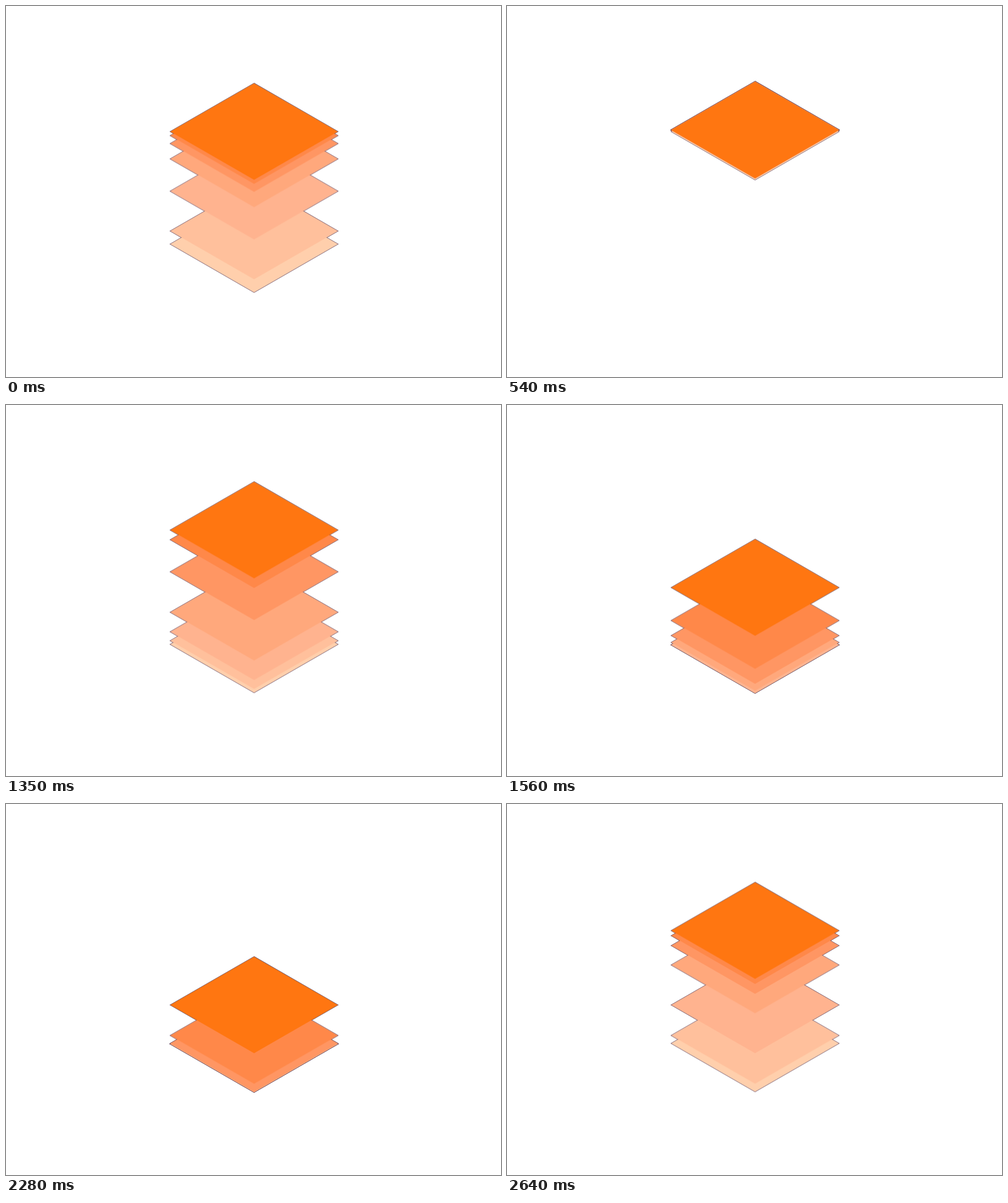
Recreate the animation shown at these times as an HTML page. Size 800 by 600 pixels, loop 2670 ms.

```html
<!DOCTYPE html>
<html lang="en">
<head>
<meta charset="utf-8">
<title>Stacked layers</title>
<style>
  html, body { margin: 0; width: 100%; height: 100%; overflow: hidden; background: #fff; }
  svg { display: block; width: 800px; height: 600px; }
  #outlines { fill: none; stroke: #4c2a44; stroke-opacity: .85; stroke-width: 1.3; }
</style>
</head>
<body>
<svg viewBox="0 0 800 600">
  <g id="outlines"></g>
  <g id="sheets"></g>
</svg>
<script>
const LOOP = 2670;
const STAGGER = 90;
const HIGH = 200.6, LOW = 388;
const RISE = { start: 2063.7, length: 725, easing: 'cubic-bezier(.47, 0, .13, 1)' };
const FALL = { start: 760, length: 650, easing: 'cubic-bezier(.517, 0, .216, 1)' };
// Top sheet first
const COLORS = ['#ff7611', '#ff8849', '#ff9663', '#ffa87c', '#ffb38f', '#ffc09c', '#ffcfac'];

const at = y => `translate(400.9px, ${y}px)`;

function addDiamond(parent, index) {
  const diamond = document.createElementNS('http://www.w3.org/2000/svg', 'polygon');
  diamond.setAttribute('points', '0,-78.1 135.4,0 0,78.1 -135.4,0');
  parent.append(diamond);

  // Sheets rise from the top down and fall from the bottom up
  const riseStart = RISE.start + STAGGER * index - LOOP;
  const fallStart = FALL.start + STAGGER * (COLORS.length - 1 - index) - riseStart;
  const motion = diamond.animate([
    { offset: 0, transform: at(LOW), easing: RISE.easing },
    { offset: RISE.length / LOOP, transform: at(HIGH) },
    { offset: fallStart / LOOP, transform: at(HIGH), easing: FALL.easing },
    { offset: (fallStart + FALL.length) / LOOP, transform: at(LOW) },
    { offset: 1, transform: at(LOW) }
  ], { duration: LOOP, delay: riseStart, iterations: Infinity });
  motion.startTime = document.timeline.currentTime;
  return diamond;
}

// All outlines lie below all fills, so only the outer silhouette shows a line
for (let i = COLORS.length - 1; i >= 0; i--) {
  addDiamond(document.getElementById('outlines'), i);
  addDiamond(document.getElementById('sheets'), i).setAttribute('fill', COLORS[i]);
}
</script>
</body>
</html>
```
